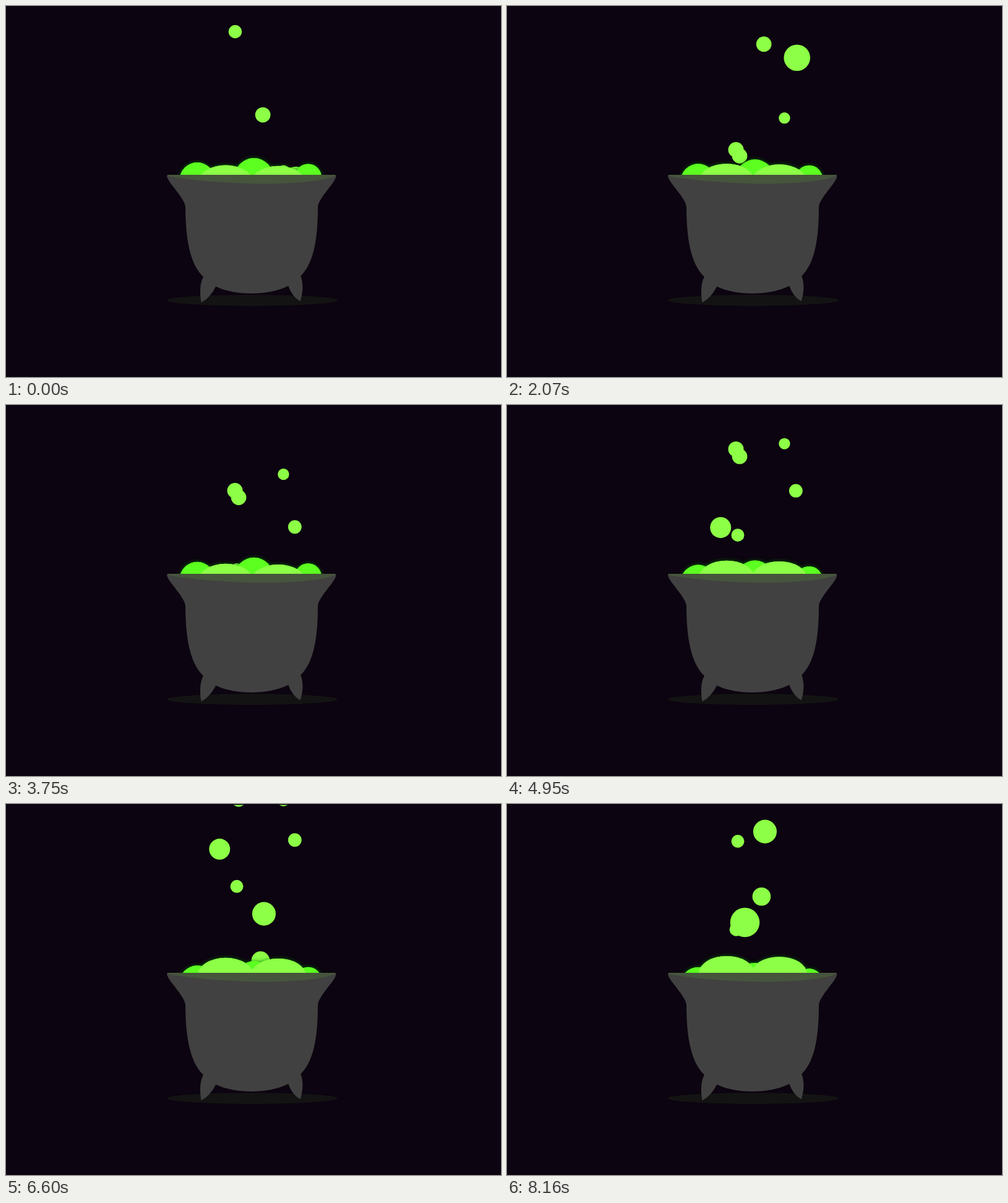
An HTML page with a canvas that plays this animation: 800x600 px, repeating every 8190 ms.

```html
<!DOCTYPE html>
<html lang="en">
<head>
<meta charset="utf-8">
<title>Bubbling cauldron</title>
<style>
  html, body { margin: 0; width: 100%; height: 100%; overflow: hidden; background: #0c0410; }
  canvas { display: block; }
</style>
</head>
<body>
<canvas id="stage" width="800" height="600"></canvas>
<script>
const ctx = document.getElementById('stage').getContext('2d');
const LOOP = 8190, STEP = 30, SWELL = 1800;
const TOP = 1.5, RIM = 273;
const DARK = '#5cff20', LIGHT = '#8cff46', IRON = '#414141';
const RISE = 0.004475;              // speed per pixel of radius: big bubbles rise faster
const CYCLE = 11533, LEAD = 3000;   // a bubble's round trip, and the part of it before the rim

// x, radius, time of crossing the rim
const bubbles = [
  [415.1, 12.35, -1754], [448.4, 9.2, -161], [468.7, 21.3, 84],
  [370, 12.5, 1346], [376, 12.35, 1516], [466.8, 10.9, 2197],
  [373, 10.45, 3612], [345.2, 16.95, 3964], [416.9, 19.05, 5481],
  [411.4, 14.8, 6300], [384.5, 23.75, 7393], [370.4, 10.7, 6698]
];

const pot = new Path2D(`M263 273 H531 Q534 273 533 277 C530 288 505 311 504 325
  C504 385 495 418 476 437 C449 474 345 474 319 438 C300 420 290 385 290 325
  C289 311 264 288 260.5 277 Q259 273 263 273 Z`);
const legs = new Path2D(`M319 438 Q311 452 315.5 479.5 Q330 472 339 454 L335 436 Z
  M476 436 Q483 455 475.5 477.5 Q462 470 456 452 L460 436 Z`);
const lip = new Path2D('M261 273 H532.5 V275 C480 294 340 289 261 275 Z');

function oval(x, y, rx, ry, color) {
  ctx.fillStyle = color;
  ctx.beginPath();
  ctx.ellipse(x, y, rx, ry, 0, 0, Math.PI * 2);
  ctx.fill();
}

function fill(path, color) {
  ctx.fillStyle = color;
  ctx.fill(path);
}

function drawBubble(x, r, crossing, t) {
  const age = (t - crossing + LEAD + CYCLE) % CYCLE - LEAD;
  oval(x, RIM - age * RISE * r, r, r, LIGHT);
}

// Dark domes sink while the light ones swell.
function drawFoam(t) {
  const p = (1 - Math.cos(t / SWELL * Math.PI * 2)) / 2;
  const dome = (x, r, crest) => oval(x, crest + 11 * p + r, r, r, DARK);
  const mound = (x, crest) => oval(x, crest - 11.8 * p + 28, 45, 28, LIGHT);
  dome(309, 28.3, 253);
  dome(400.7, 31.5, 246);
  dome(488.3, 21.5, 255.4);
  mound(355, 257.6);
  mound(440, 258.8);
}

function drawBrew(t) {
  ctx.save();
  ctx.beginPath();
  ctx.rect(0, TOP, 800, RIM + 1 - TOP);
  ctx.clip();
  for (const bubble of bubbles) drawBubble(...bubble, t);
  // The glow lies behind the whole foam, so it is painted first.
  ctx.shadowColor = 'rgba(0, 128, 0, 0.8)';
  ctx.shadowBlur = 6;
  drawFoam(t);
  ctx.shadowColor = 'transparent';
  drawFoam(t);
  ctx.restore();
}

function draw(t) {
  ctx.fillStyle = '#0c0410';
  ctx.fillRect(0, 0, 800, 600);
  oval(398, 476, 138, 9, '#131313');
  drawBrew(t);
  fill(pot, IRON);
  fill(legs, IRON);
  ctx.save();
  ctx.clip(pot);
  fill(lip, '#46553c');
  ctx.restore();
}

let start;
function tick(now) {
  start ??= now;
  draw(Math.floor((now - start) % LOOP / STEP) * STEP);
  requestAnimationFrame(tick);
}
draw(0);
requestAnimationFrame(tick);
</script>
</body>
</html>
```
